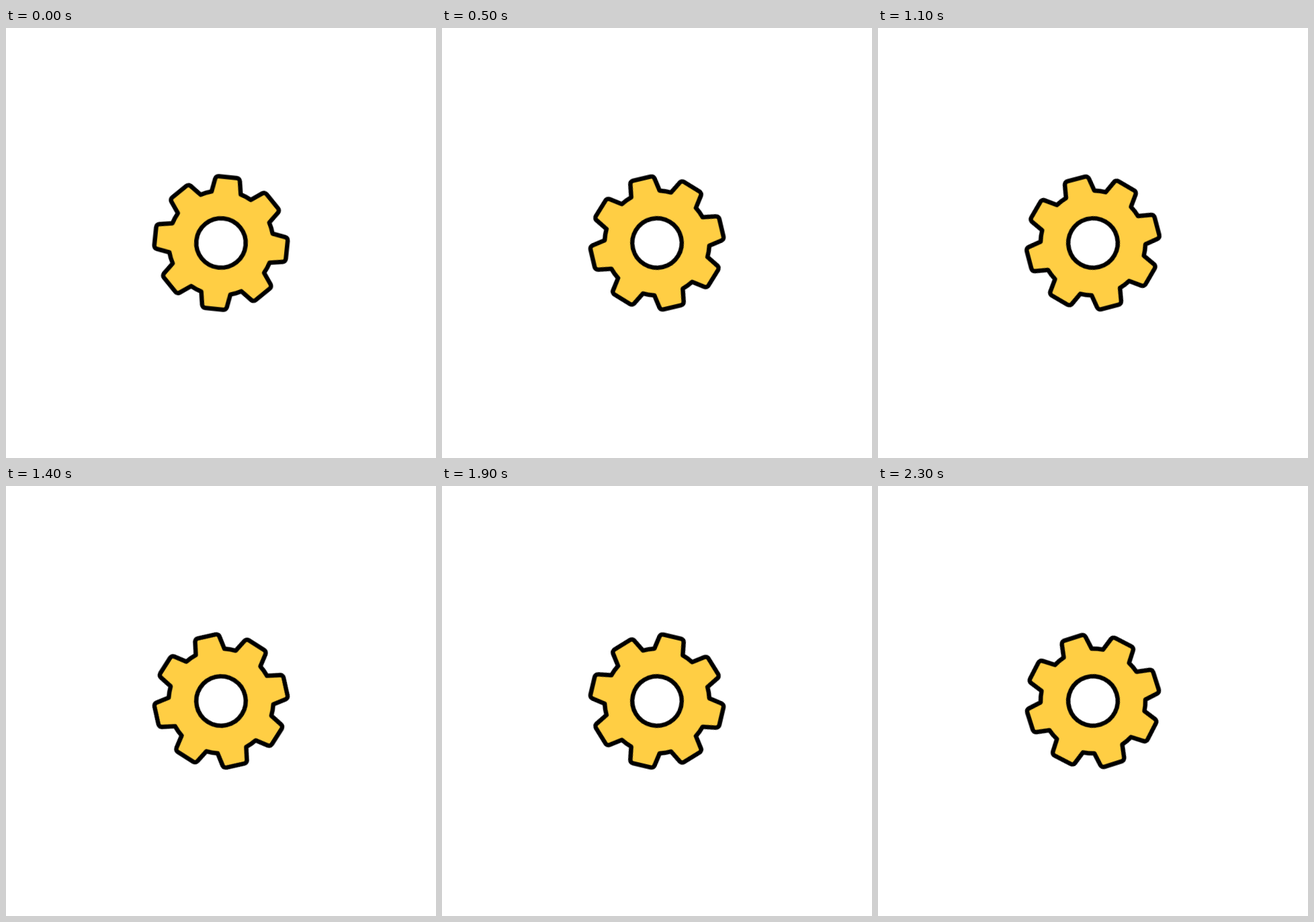
Recreate the animation shown at these times as an HTML page. Size 640 px wide and 640 px high, loop 2.4 s.

```html
<!DOCTYPE html>
<html lang="en">
<head>
<meta charset="utf-8">
<title>Turning gear</title>
<style>
  html, body { margin: 0; width: 100%; height: 100%; overflow: hidden; background: #fff; }
  svg { display: block; width: 640px; height: 640px; }
  #gear { stroke: #000; stroke-width: 6.5; stroke-linejoin: round; transform-origin: 0 0; }
</style>
</head>
<body>
<svg viewBox="-320 -320 640 640">
  <g id="gear">
    <path id="body" fill="#ffce44"/>
    <circle r="36.8" fill="#fff"/>
  </g>
</svg>
<script>
  const TEETH = 8;
  const ROOT = 78;        // radius of the valleys
  const TIP = 98.4;       // distance of the flat tooth tops
  const HALF_ROOT = 21.8; // half width of a tooth at its base
  const HALF_TIP = 17.8;  // half width of a tooth at its top
  const CORNER = 5;

  const LOOP = 2400;
  const POSES = 24;
  const TICK = 360 / 61;  // degrees per 40 ms tick

  function gearPath() {
    const rootY = -Math.sqrt(ROOT ** 2 - HALF_ROOT ** 2);
    const lean = Math.atan2(HALF_ROOT - HALF_TIP, TIP + rootY);
    const cut = CORNER * Math.tan((Math.PI / 2 - lean) / 2);
    const sideX = HALF_TIP + cut * Math.sin(lean);
    const sideY = -TIP + cut * Math.cos(lean);
    const topX = HALF_TIP - cut;

    let d = "";
    for (let i = 0; i < TEETH; i++) {
      const a = i * 2 * Math.PI / TEETH;
      const c = Math.cos(a), s = Math.sin(a);
      const at = (x, y) => `${(x * c - y * s).toFixed(3)} ${(x * s + y * c).toFixed(3)}`;
      const arc = (r, x, y) => `A${r} ${r} 0 0 1 ${at(x, y)}`;
      d += i ? arc(ROOT, -HALF_ROOT, rootY) : `M${at(-HALF_ROOT, rootY)}`;
      d += `L${at(-sideX, sideY)}` + arc(CORNER, -topX, -TIP);
      d += `L${at(topX, -TIP)}` + arc(CORNER, sideX, sideY);
      d += `L${at(HALF_ROOT, rootY)}`;
    }
    return `${d}A${ROOT} ${ROOT} 0 0 1 ${-HALF_ROOT} ${rootY.toFixed(3)}Z`;
  }

  document.getElementById("body").setAttribute("d", gearPath());

  // Each pose holds for 100 ms and shows the tick reached by then.
  const turn = k => `rotate(${(Math.floor(k * 2.5) + 1) * TICK}deg)`;
  const frames = Array.from({ length: POSES + 1 }, (_, k) => ({
    offset: k / POSES,
    transform: turn(Math.min(k, POSES - 1)),
    easing: "step-end"
  }));
  document.getElementById("gear").animate(frames, { duration: LOOP, iterations: Infinity });
</script>
</body>
</html>
```
